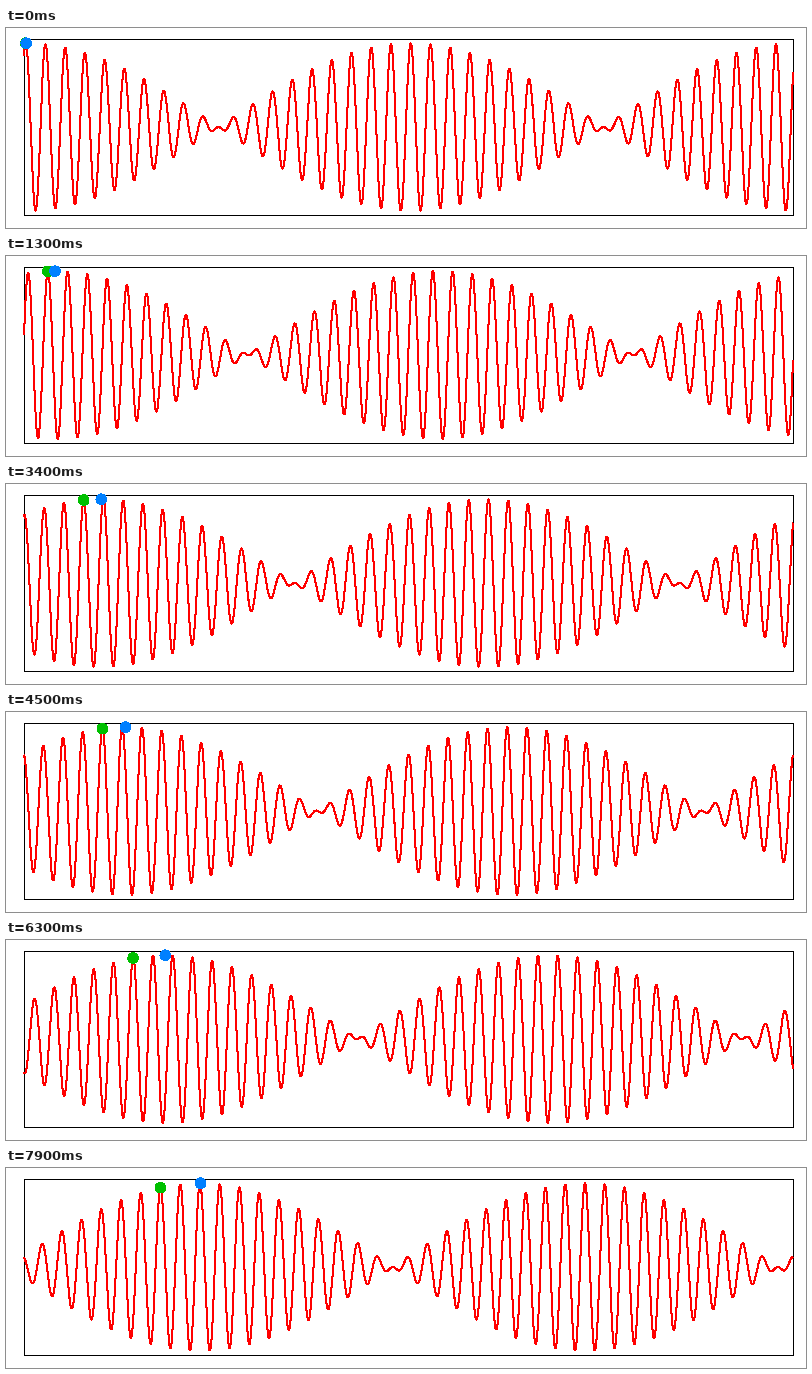
A matplotlib script for the animation above (8000 ms loop, 800 by 200 pixels).

```python
import matplotlib.pyplot as plt
import numpy as np
from matplotlib.animation import FuncAnimation
from matplotlib.patches import Circle, Rectangle

W, H, DPI = 800, 200, 100
LEFT, TOP, SPAN, HEIGHT = 18, 11, 770, 177
MID, AMP = 99, 83.8
FRAMES, STEP_MS = 80, 100

# Two equal waves with 38 and 40 cycles across the box
K_CARRIER = 2 * np.pi * 39 / SPAN
K_ENVELOPE = 2 * np.pi / SPAN
V_PHASE, V_GROUP = 1.706, 2.207  # pixels per step


def envelope(x, n):
    return np.cos(K_ENVELOPE * (x - LEFT - V_GROUP * n))


def wave(x, n):
    carrier = np.cos(K_CARRIER * (x - LEFT - V_PHASE * n))
    return MID - AMP * envelope(x, n) * carrier


fig = plt.figure(figsize=(W / DPI, H / DPI), dpi=DPI, facecolor="white")
ax = fig.add_axes([0, 0, 1, 1])
ax.set_xlim(0, W)
ax.set_ylim(H, 0)
ax.axis("off")

# A crisp one-pixel frame: black box with a white box inside
for inset, color in ((0, "black"), (1, "white")):
    ax.add_patch(Rectangle((LEFT + inset, TOP + inset), SPAN - 2 * inset,
                           HEIGHT - 2 * inset, fc=color, ec="none", zorder=1))

# Without antialiasing every touched pixel is filled, so this looks 2 px wide
xs = np.linspace(LEFT, LEFT + SPAN - 1, 2 * SPAN - 1)
line, = ax.plot([], [], color="#ff0000", lw=72 / DPI, aa=False, zorder=2,
                solid_capstyle="butt", solid_joinstyle="round")


def add_dot(color, z):
    return ax.add_patch(Circle((LEFT, MID), 5.25, fc=color, ec="none",
                               aa=False, zorder=z))


phase_dot = add_dot("#00c000", 3)
group_dot = add_dot("#0080ff", 4)


def update(i):
    n = i + 1
    line.set_data(xs, wave(xs, n))
    xp = LEFT + V_PHASE * n
    xg = LEFT + V_GROUP * n
    phase_dot.center = xp, wave(xp, n)
    group_dot.center = xg, MID - AMP * envelope(xg, n)
    return line, phase_dot, group_dot


anim = FuncAnimation(fig, update, frames=FRAMES, interval=STEP_MS,
                     repeat=True, repeat_delay=0, blit=False)
plt.show()
```
